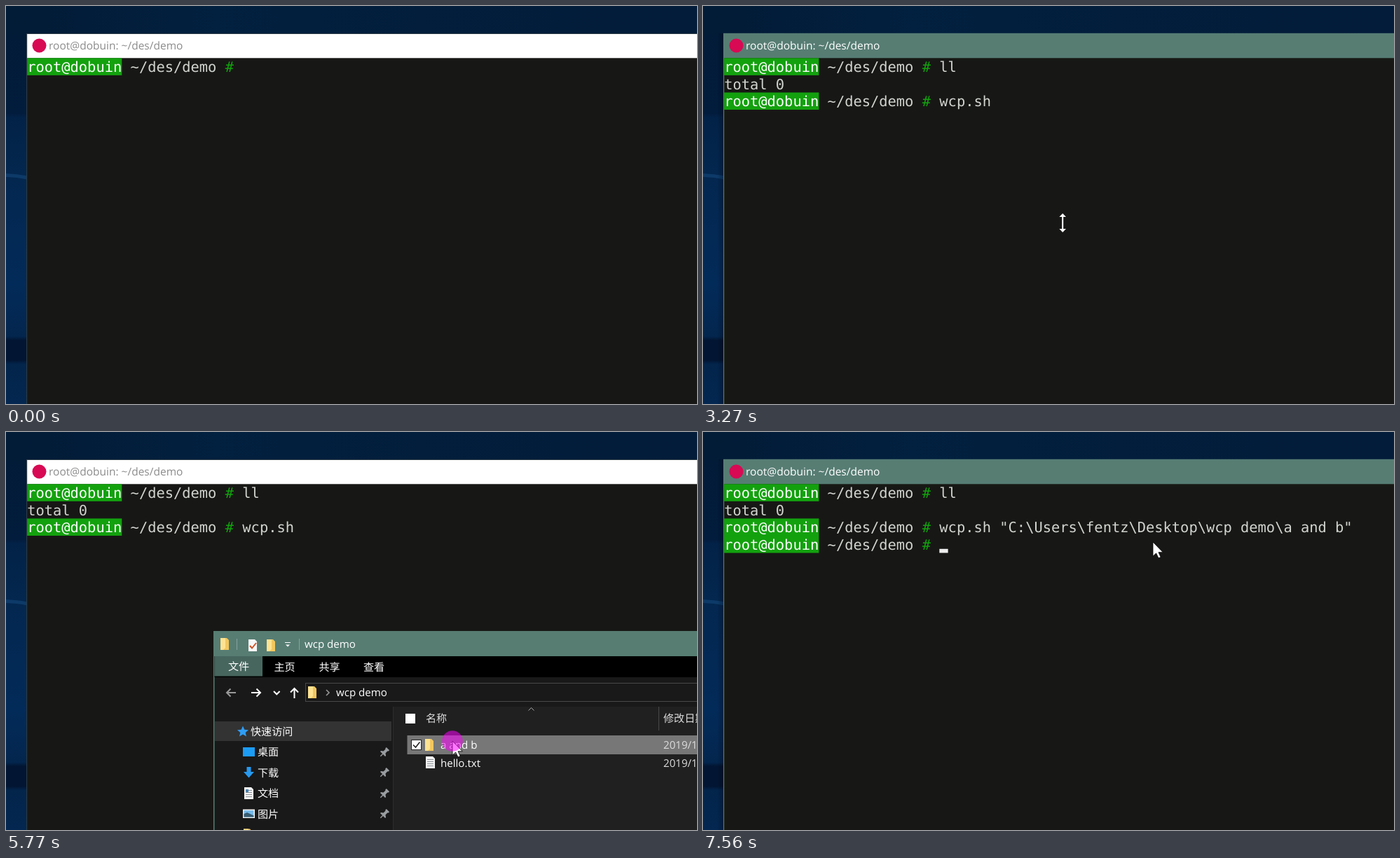
An HTML page for the animation above (8000 ms loop, 986 by 568 pixels).

```html
<!DOCTYPE html>
<html lang="zh">
<head>
<meta charset="utf-8">
<title>Drag a folder into the terminal</title>
<style>
  html, body { margin: 0; width: 100%; height: 100%; overflow: hidden; background: #021a36; }
  svg { display: block; width: 986px; height: 568px; }
  text { white-space: pre; text-rendering: geometricPrecision; }
  .mono { font: 20.405px "DejaVu Sans Mono", monospace; fill: #d2d4d0; }
  .ui { font: 15.1px "Open Sans", "Noto Sans CJK SC", "Noto Sans CJK", sans-serif; fill: #fff; }
  .title { font-size: 15.5px; }
  .line { fill: none; stroke: #fff; stroke-width: 2; }
</style>
</head>
<body>
<svg viewBox="0 0 986 568">
  <defs>
    <linearGradient id="top">
      <stop offset="0" stop-color="#021b36"/><stop offset=".3" stop-color="#02203f"/>
      <stop offset=".6" stop-color="#021e3c"/><stop offset="1" stop-color="#021c39"/>
    </linearGradient>
    <linearGradient id="side" x2="0" y2="1">
      <stop offset="0" stop-color="#021b36"/><stop offset=".27" stop-color="#021c3d"/>
      <stop offset=".28" stop-color="#032247"/><stop offset=".42" stop-color="#03274f"/>
      <stop offset=".7" stop-color="#032b59"/><stop offset=".83" stop-color="#03264e"/>
      <stop offset=".84" stop-color="#021532"/><stop offset=".89" stop-color="#021533"/>
      <stop offset=".9" stop-color="#03254c"/><stop offset="1" stop-color="#032750"/>
    </linearGradient>
    <linearGradient id="shade">
      <stop offset="0" stop-opacity="0"/><stop offset="1" stop-opacity=".25"/>
    </linearGradient>
    <g id="folder">
      <path d="M0 0H9L12 3V17H0Z" fill="#f3c75f"/>
      <path d="M0 0H7V14L4 17H0Z" fill="#ffe391"/>
    </g>
    <g id="page">
      <path d="M0 0H10L13 3V17H0Z" fill="#f4f4f4"/>
      <path d="M2 4.5H11M2 7.5H11M2 10.5H11M2 13.5H11" stroke="#8a8f94"/>
    </g>
    <g id="pin" transform="rotate(45)" fill="#9a9da0">
      <path d="M-3-7H3V-5L2-4V0L5 2V3.5H.7V8H-.7V3.5H-5V2L-2 0V-4L-3-5Z"/>
    </g>
  </defs>

  <rect width="986" height="568" fill="url(#side)"/>
  <rect width="986" height="40" fill="url(#top)"/>
  <path d="M0 241.5Q16 242 30 245" fill="none" stroke="#1b5288" stroke-width="5" opacity=".45"/>

  <g id="terminal">
    <rect x="29" y="39" width="957" height="530" fill="#2b3a45"/>
    <rect x="30.2" y="40" width="956" height="35" fill="#fff"/>
    <g data-on="700-3350 6900-8000">
      <rect x="20" y="39" width="9" height="529" fill="url(#shade)"/>
      <rect x="29" y="38.8" width="957" height="530" fill="#577d73"/>
    </g>
    <rect x="30.2" y="74.3" width="956" height="494" fill="#171815"/>
    <circle cx="47.5" cy="56.5" r="10" fill="#d70a53"/>
    <text id="caption" class="ui title" x="61" y="62">root@dobuin: ~/des/demo</text>
    <g id="screen" class="mono"></g>
    <rect id="caret" width="12.3" height="5.7" fill="#eee"/>
  </g>

  <g id="explorer" data-on="3350-6900">
    <rect x="296" y="284" width="690" height="284" fill="#577d73"/>
    <rect x="297.5" y="320" width="689" height="248" fill="#191919"/>
    <rect x="297.5" y="320" width="689" height="30" fill="#000"/>
    <rect x="297.5" y="320" width="68.5" height="28.5" fill="#47665e"/>
    <rect x="553" y="392" width="433" height="176" fill="#202020"/>
    <path d="M552.5 392V568" stroke="#2d2d2d"/>
    <path d="M329.5 295V311M418.5 295V311" stroke="#86a39c"/>
    <use href="#folder" x="306" y="294"/>
    <path d="M346 296H355L358 299V313H346Z" fill="#f7f7f7"/>
    <path d="M348 305L351 308.5L357 301" fill="none" stroke="#cf5327" stroke-width="2"/>
    <use href="#folder" x="372" y="296"/>
    <path d="M398 300.5H406" stroke="#fff"/>
    <path d="M399 303.5H405L402 306.5Z" fill="#fff"/>
    <rect x="427.5" y="358.5" width="570" height="26" fill="#191919" stroke="#484848"/>
    <path class="line" d="M328 372H315M320.5 366.5L315 372L320.5 377.5" style="stroke:#999"/>
    <path class="line" d="M350 372H363M357.5 366.5L363 372L357.5 377.5"/>
    <path class="line" d="M382 370L386.3 374.3L390.6 370"/>
    <path class="line" d="M411.5 380V366M406 371.5L411.5 366L417 371.5"/>
    <use href="#folder" x="431" y="363"/>
    <path class="line" d="M457 368L461 372L457 376" style="stroke:#999;stroke-width:1.6"/>

    <rect x="298" y="413" width="252" height="28" fill="#333"/>
    <path d="M338 419.5L340.3 424.8L346 425.2L341.7 429L343 434.5L338 431.5L333 434.5L334.3 429L330 425.2L335.7 424.8Z" fill="#2f9df4"/>
    <rect x="338" y="450" width="17" height="13" fill="#1c9cf5"/>
    <path d="M343.5 478H349.5V485H354L346.5 493.5L339 485H343.5Z" fill="#269af0"/>
    <use href="#page" x="340" y="507"/>
    <rect x="342" y="510" width="4" height="4" fill="#4b83b0"/>
    <rect x="338" y="538.5" width="17" height="12.5" fill="#f2f2f2"/>
    <rect x="339.5" y="540" width="14" height="9.5" fill="#77bbea"/>
    <path d="M339.5 545L344 543L353.5 547.5V549.5H339.5Z" fill="#385c70"/>
    <use href="#folder" x="339" y="566.5"/>
    <use href="#pin" x="540" y="457"/><use href="#pin" x="540" y="486"/>
    <use href="#pin" x="540" y="516"/><use href="#pin" x="540" y="545"/>

    <rect x="570" y="402" width="14" height="14" fill="#fff"/>
    <path d="M745.5 397.5L749.5 393.5L753.5 397.5" fill="none" stroke="#aaa"/>
    <path d="M931.5 392V426" stroke="#484848"/>

    <g data-on="3820-4840">
      <rect x="572.5" y="459.5" width="414" height="26" fill="#4d4d4d"/>
      <rect x="578.5" y="465" width="14.5" height="14.5" fill="#fff"/>
    </g>
    <g data-on="4840-8000">
      <rect x="572.5" y="433" width="414" height="27" fill="#777"/>
      <rect x="578.5" y="439.5" width="14" height="14" fill="#fff" stroke="#222"/>
      <path d="M581 446.5L584.5 450L590.5 442.5" fill="none" stroke="#222" stroke-width="1.6"/>
    </g>
    <use href="#folder" x="598" y="438"/>
    <use href="#page" x="599" y="463"/>
    <g id="labels" class="ui"></g>
  </g>

  <g id="mouse" data-on="250-8000">
    <path data-on="250-3270 3350-8000" d="M0 0V20.3L4.6 16L8 23L11.2 21.6L8 14.7H14.3Z" fill="#fff" stroke="#000" stroke-width=".8"/>
    <path data-on="3270-3350" d="M-.8-13L4-8H.2V9H4L-.8 14L-5.6 9H-1.8V-8H-5.6Z" fill="#fff"/>
    <g data-on="6070-6550">
      <rect x="2" y="20.5" width="14" height="9" fill="none" stroke="#ccc" stroke-dasharray="3 2"/>
      <rect x="12" y="24.5" width="12" height="12" fill="#fff"/>
      <path d="M18 27V34M14.5 30.5H21.5" stroke="#000" stroke-width="2"/>
    </g>
    <circle data-on="700-950 4690-4920 5770-6550 6900-7120" r="14.8" fill="#f0f" fill-opacity=".53"/>
  </g>
</svg>
<script>
const LOOP = 8000, CELL = 12.285, ROW = 2 * CELL, LEFT = 30.2, TOP = 74.3;
const $ = id => document.getElementById(id);

function add(parent, tag, attrs, content = '') {
  const node = document.createElementNS('http://www.w3.org/2000/svg', tag);
  for (const key in attrs) node.setAttribute(key, attrs[key]);
  node.textContent = content;
  return parent.appendChild(node);
}

function print(start, row, col, content, fill = '') {
  add($('screen'), 'text', {
    x: LEFT + col * CELL, y: TOP + row * ROW + 19.8,
    'data-on': `${start}-${LOOP}`, style: fill && `fill:${fill}`
  }, content);
}

function prompt(start, row) {
  add($('screen'), 'rect', {
    x: LEFT, y: TOP + row * ROW, width: 11 * CELL, height: ROW,
    fill: '#13a10e', 'data-on': `${start}-${LOOP}`
  });
  print(start, row, 0, 'root@dobuin', '#fff');
  print(start, row, 12, '~/des/demo');
  print(start, row, 23, '#', '#13a10e');
}

prompt(0, 0);
print(1060, 0, 25, 'l');
print(1210, 0, 26, 'l');
print(1390, 1, 0, 'total 0');
prompt(1430, 2);
print(1720, 2, 25, 'w');
print(1900, 2, 26, 'c');
print(2040, 2, 27, 'p');
print(2240, 2, 28, '.sh');
print(6550, 2, 32, String.raw`"C:\Users\fentz\Desktop\wcp demo\a and b"`);
prompt(7560, 3);

const labels = [
  [426, 308, 'wcp demo'], [317, 340, '文件'], [382.5, 341, '主页'],
  [446.5, 341, '共享'], [510, 341, '查看'], [471, 377, 'wcp demo'],
  [349, 433, '快速访问'], [359, 462, '桌面'], [359, 492, '下载'],
  [359, 521, '文档'], [359, 551, '图片'], [599, 414, '名称', '#ddd'],
  [938, 414, '修改日期', '#ddd'], [620, 452, 'a and b'], [620, 478, 'hello.txt'],
  [938, 452, '2019/11/', '#ddd'], [938, 478, '2019/11/', '#ddd']
];
for (const [x, y, content, fill = '#fff'] of labels)
  add($('labels'), 'text', { x, y, style: `fill:${fill}` }, content);

// Text caret: start, end, column, row
const carets = [
  [700, 1060, 25, 0], [1060, 1210, 26, 0], [1210, 1390, 27, 0],
  [1430, 1720, 25, 2], [1720, 1900, 26, 2], [1900, 2040, 27, 2],
  [2040, 2240, 28, 2], [2240, 2830, 32, 2], [6900, 7380, 73, 2],
  [7380, 7560, 0, 3], [7560, LOOP, 25, 3]
];

// Pointer: start, end, steps, target x, target y, ease-out power
const moves = [
  [250, 550, 8, 494.5, 292, 2], [2830, 2940, 3, 514, 309, 1],
  [3350, 3440, 3, 770, 520, 1], [3820, 4110, 7, 675, 433, 3.7],
  [4340, 4440, 3, 667, 435, 1], [5390, 5620, 5, 637, 441, 1.5],
  [5980, 6220, 6, 726, 140, 1.3], [6270, 6500, 5, 642, 157, 1.6]
];

function pointer(t) {
  let x = 530, y = 572;
  for (const [start, end, steps, tx, ty, power] of moves) {
    if (t < start) break;
    const step = Math.floor(Math.min(1, (t - start) / (end - start)) * (steps - 1) + 1e-6);
    const p = 1 - (1 - (step + 1) / steps) ** power;
    x += (tx - x) * p;
    y += (ty - y) * p;
  }
  return [x, y];
}

const timed = [...document.querySelectorAll('[data-on]')].map(node => ({
  node, spans: node.dataset.on.split(' ').map(span => span.split('-').map(Number))
}));
const within = (t, [start, end]) => t >= start && t < end;

function draw(t) {
  for (const { node, spans } of timed)
    node.style.display = spans.some(span => within(t, span)) ? '' : 'none';

  const focused = within(t, [700, 3350]) || t >= 6900;
  $('caption').style.fill = focused ? '#fff' : '#8c8c8c';

  const caret = carets.find(span => within(t, span));
  $('caret').style.display = caret ? '' : 'none';
  if (caret) {
    $('caret').setAttribute('x', LEFT + caret[2] * CELL);
    $('caret').setAttribute('y', TOP + caret[3] * ROW + 18.8);
  }

  const opened = t < 3400 ? .4 : t < 3440 ? .85 : 1;
  $('explorer').setAttribute('opacity', opened);
  $('explorer').setAttribute('transform', `translate(0 ${(1 - opened) * 60})`);
  $('mouse').setAttribute('transform', `translate(${pointer(t)})`);
}

const begin = performance.now();
function tick() {
  draw((performance.now() - begin) % LOOP);
  requestAnimationFrame(tick);
}
tick();
</script>
</body>
</html>
```
